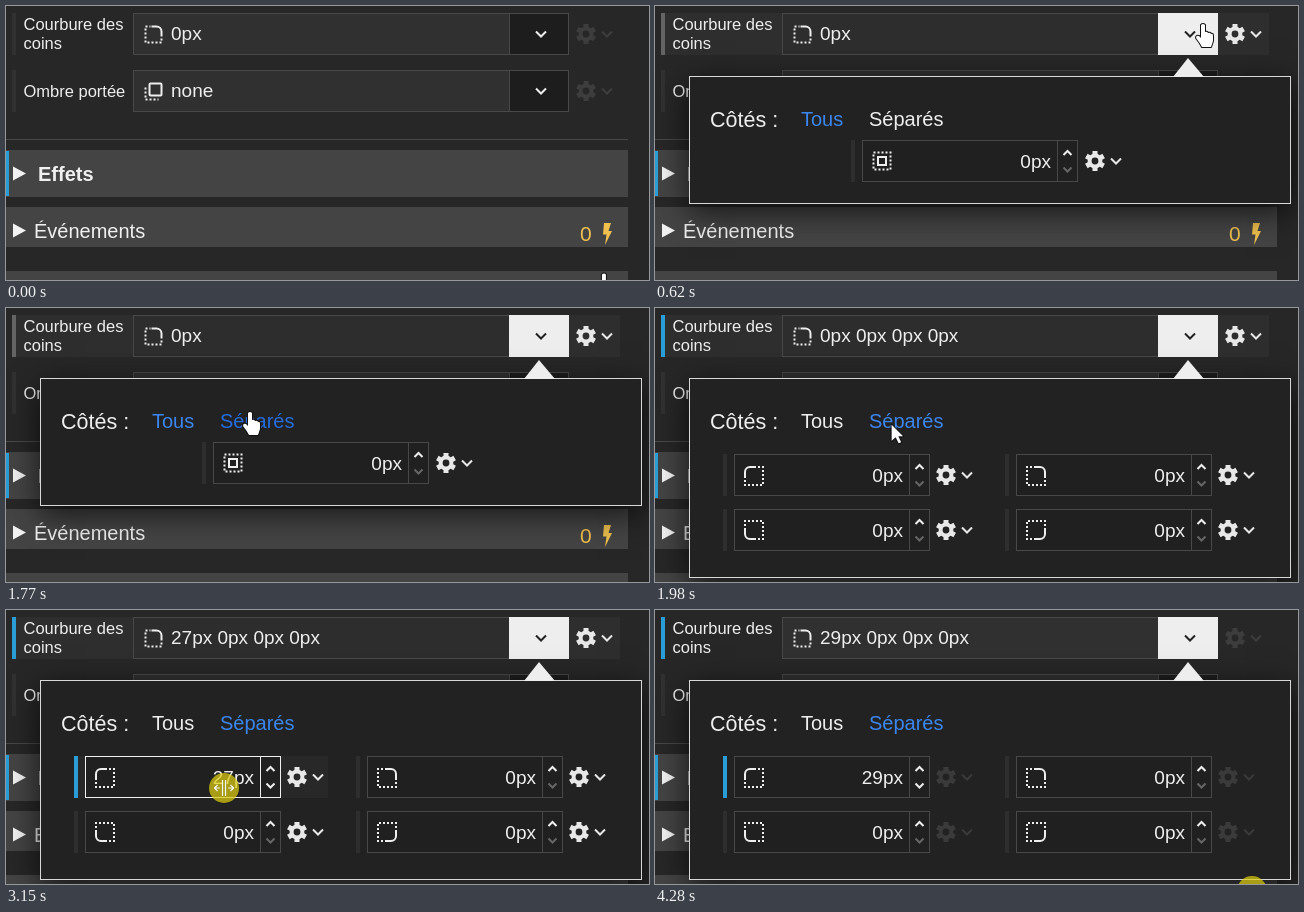
An HTML page with a canvas that plays this animation: 643 px wide and 274 px high, repeating every 4.35 s.

```html
<!DOCTYPE html>
<html lang="fr">
<head>
<meta charset="utf-8">
<title>Courbure des coins</title>
<style>
  html, body { margin: 0; width: 100%; height: 100%; overflow: hidden; background: #272727; }
  canvas { display: block; }
</style>
</head>
<body>
<canvas id="stage" width="643" height="274"></canvas>
<script>
const c = document.getElementById('stage').getContext('2d');
const LOOP = 4350, OPEN = 620, SPLIT = 1840, RELEASE = 3290, LEAVE = 3540;
const BLUE = '#2b9dd6', YELLOW = '#f0c14e', LINK = '#3b86ee', WHITE = '#eee';

// Pointer path: time, x, y
const path = [
  [0, 597, 267], [280, 578, 150], [480, 549, 30], [550, 547, 17], [820, 547, 17],
  [1100, 328, 98], [1240, 268, 120], [1310, 245, 121], [1450, 243, 112], [1600, 243, 103],
  [1850, 243, 103], [2200, 226, 140], [2470, 207, 160], [2600, 191, 173], [2680, 191, 173],
  [2940, 209, 173], [3150, 218, 178], [3250, 220, 177], [3480, 440, 258], [3550, 490, 290],
  [3900, 597, 281], [LOOP, 597, 281]
];
const presses = [[540, 620], [1630, 1770], [2640, RELEASE], [4280, LOOP]];

const hand = new Path2D('M-2 1Q0-1 2 1V8Q4 7 5 9Q7 8 8 10Q10 9 10 12V17Q9 20 8 23H-1Q-3 19-7 14Q-7 11-4 12L-2 14Z');
const arrow = new Path2D('M0 0V16L4 12.5L7 18.5L9.5 17.5L6.7 11.5H11.5Z');
const resize = new Path2D('M-1.5-8V8M1.5-8V8M-4 0H-9M-6.5-3L-9.5 0L-6.5 3M4 0H9M6.5-3L9.5 0L6.5 3');
const bolt = new Path2D('M598 217H605L602.5 225H606L599 239L600.5 228.5H597Z');

const ramp = (t, start, length) => Math.min(1, Math.max(0, (t - start) / length));
const gray = (a, b, k) => { const v = Math.round(a + (b - a) * k); return `rgb(${v},${v},${v})`; };

function pointer(t) {
  const i = path.findIndex(p => p[0] > t), [t0, x0, y0] = path[i - 1], [t1, x1, y1] = path[i];
  const k = (t - t0) / (t1 - t0);
  return [x0 + (x1 - x0) * k, y0 + (y1 - y0) * k];
}

function rect(x, y, w, h, fill) {
  c.fillStyle = fill;
  c.fillRect(x, y, w, h);
}

function box(x, y, w, h, fill, edge) {
  rect(x, y, w, h, fill);
  c.strokeStyle = edge;
  c.lineWidth = 1;
  c.strokeRect(x + .5, y + .5, w - 1, h - 1);
}

function text(s, x, y, size, fill = WHITE, align = 'left', weight = '') {
  c.font = `${weight} ${size}px "Liberation Sans", Arial, sans-serif`;
  c.textAlign = align;
  c.fillStyle = fill;
  c.fillText(s, x, y);
}

function poly(fill, ...p) {
  c.fillStyle = fill;
  c.beginPath();
  for (let i = 0; i < p.length; i += 2) c.lineTo(p[i], p[i + 1]);
  c.fill();
}

function chevron(x, y, color, dir = 1, r = 5) {
  c.strokeStyle = color;
  c.lineWidth = 2;
  c.beginPath();
  c.moveTo(x - r, y - dir * r / 2);
  c.lineTo(x, y + dir * r / 2);
  c.lineTo(x + r, y - dir * r / 2);
  c.stroke();
}

function gear(x, y, color) {
  c.strokeStyle = color;
  c.lineWidth = 4;
  c.beginPath();
  c.arc(x, y, 5.4, 0, 7);
  c.stroke();
  c.lineWidth = 5;
  c.beginPath();
  for (let i = 0; i < 6; i++) {
    const a = Math.PI * (i / 3 + .5);
    c.moveTo(x + 6 * Math.cos(a), y + 6 * Math.sin(a));
    c.lineTo(x + 10 * Math.cos(a), y + 10 * Math.sin(a));
  }
  c.stroke();
  chevron(x + 21, y, color);
}

function strokeIcon(x, y, turns, draw) {
  c.save();
  c.translate(x, y);
  c.rotate(turns * Math.PI / 2);
  c.strokeStyle = WHITE;
  c.lineWidth = 2;
  c.beginPath();
  draw();
  c.stroke();
  c.restore();
}

// Dotted square with one solid rounded corner (top left, then clockwise)
function cornerIcon(x, y, turns, r) {
  strokeIcon(x, y, turns, () => {
    c.moveTo(-r, 2);
    c.arcTo(-r, -r, 2, -r, 5);
    c.lineTo(2, -r);
  });
  strokeIcon(x, y, turns, () => {
    c.setLineDash([2, 2]);
    c.moveTo(4, -r);
    c.lineTo(r, -r);
    c.lineTo(r, r);
    c.lineTo(-r, r);
    c.lineTo(-r, 3);
  });
}

function allIcon(x, y) {
  strokeIcon(x, y, 0, () => { c.setLineDash([2, 2]); c.rect(-8.5, -8.5, 17, 17); });
  strokeIcon(x, y, 0, () => c.rect(-4, -4, 8, 8));
}

function shadowIcon(x, y) {
  strokeIcon(x, y, 0, () => c.roundRect(-4, -8, 12, 12, 1));
  strokeIcon(x, y, 0, () => {
    c.setLineDash([2, 2]);
    c.moveTo(-8, -4);
    c.lineTo(-8, 8);
    c.lineTo(5, 8);
  });
}

function propertyRow(y, value, hover, open, bar) {
  rect(10, y, 604, 42, gray(39, 46, hover));
  rect(6, y, 4, 42, bar || gray(49, 100, hover));
  box(127, y, 377, 42, gray(48, 45, hover), '#484848');
  box(503, y, 60, 42, open ? WHITE : '#1d1d1d', open ? WHITE : '#484848');
  chevron(535, y + 21, open ? '#222' : WHITE);
  gear(580, y + 21, gray(61, 232, hover));
  text(value, 165, y + 27, 19);
}

function numberField(x, y, w, value, lit, hover = 0, bar) {
  const edge = gray(72, 240, hover), spin = x + w;
  if (hover) rect(x - 7, y, w + 75, 42, gray(34, 40, hover));
  rect(x - 11, y, 4, 42, bar || gray(46, 100, hover));
  box(x, y, w + 1, 42, '#202020', edge);
  box(spin, y, 21, 42, '#202020', edge);
  chevron(spin + 10.5, y + 13, WHITE, -1, 4);
  chevron(spin + 10.5, y + 29.5, value ? WHITE : '#666', 1, 4);
  gear(spin + 38 - (w > 180 ? 0 : 1), y + 21, gray(58, 232, lit));
  text(value + 'px', spin - 6, y + 28, 19, WHITE, 'right');
}

function section(y, h, label, x, weight) {
  rect(0, y, 622, h, '#444');
  if (!label) return;
  const m = y + 23.5;
  poly('#f2f2f2', 7, m - 7, 20, m, 7, m + 7);
  text(label, x, m + 7, 20, '#f0f0f0', 'left', weight);
}

function popup(t, value, lit) {
  const split = t >= SPLIT, h = split ? 200 : 128;
  c.save();
  c.shadowColor = 'rgba(0,0,0,.7)';
  c.shadowBlur = 30;
  c.shadowOffsetY = 8;
  rect(34, 70, 602, h, '#222');
  c.restore();
  box(34, 70, 602, h, '#222', '#d8d8d8');
  poly(WHITE, 518, 71, 533, 52, 549, 71);
  text('Côtés :', 55, 121, 21.5);
  text('Tous', 146, 120, 20, split ? WHITE : LINK);
  const k = ramp(t, 1380, 120), mix = (a, b) => Math.round(a + (b - a) * k);
  text('Séparés', 214, 120, 20, split ? LINK : `rgb(${mix(238, 38)},${mix(238, 108)},${mix(238, 222)})`);
  if (!split) {
    numberField(207, 134, 195, 0, 1);
    allIcon(227, 155);
    return;
  }
  const hover = ramp(t, 2200, 150) * (1 - ramp(t, 3330, 100));
  numberField(79, 146, 175, value, lit, hover, value ? BLUE : null);
  numberField(361, 146, 175, 0, lit);
  numberField(79, 201, 175, 0, lit);
  numberField(361, 201, 175, 0, lit);
  cornerIcon(99, 168, 0, 9);
  cornerIcon(381, 168, 1, 9);
  cornerIcon(99, 222, 3, 9);
  cornerIcon(381, 222, 2, 9);
}

function drawPointer(t) {
  const [x, y] = pointer(t);
  if (presses.some(([a, b]) => t >= a && t < b)) {
    c.fillStyle = 'rgba(220,205,15,.72)';
    c.beginPath();
    c.arc(x, y, 15, 0, 7);
    c.fill();
  }
  c.save();
  c.translate(x, y);
  c.lineJoin = 'round';
  if (t >= 2200 && t < RELEASE) {
    c.lineWidth = 1.2;
    c.strokeStyle = '#f4f4f4';
    c.stroke(resize);
  } else {
    const isHand = t < 880 || t >= 1380 && t < 1980;
    const shape = isHand ? hand : arrow;
    if (isHand) c.translate(1, 1);
    c.lineWidth = 2;
    c.strokeStyle = '#111';
    c.stroke(shape);
    c.fillStyle = '#fff';
    c.fill(shape);
  }
  c.restore();
}

function draw(t) {
  const lit = 1 - ramp(t, LEAVE, 400), open = t >= OPEN;
  const x = t < RELEASE ? pointer(t)[0] : 220;
  const value = t < 2680 ? 0 : Math.min(29, Math.round(x - 191));

  rect(0, 0, 643, 274, '#272727');
  propertyRow(7, t < SPLIT ? '0px' : `${value}px 0px 0px 0px`, ramp(t, 400, 130) * lit, open, t >= SPLIT && BLUE);
  cornerIcon(147.5, 28.5, 1, 8);
  propertyRow(64, 'none', ramp(t, 300, 80) * (1 - ramp(t, 420, 120)), false);
  shadowIcon(147.5, 85.5);
  text('Courbure des', 17.5, 24, 16.5);
  text('coins', 17.5, 43, 16.5);
  text('Ombre portée', 17.5, 91, 16.5);

  rect(0, 133, 622, 1, '#484848');
  section(144, 47, 'Effets', 32, 'bold');
  rect(0, 145, 3, 45, BLUE);
  section(201, 40, 'Événements', 28);
  section(265, 9);
  text('0', 574, 235, 21, YELLOW);
  c.fillStyle = YELLOW;
  c.fill(bolt);

  if (open) popup(t, value, lit);
  drawPointer(t);
}

const start = performance.now();
function tick() {
  draw((performance.now() - start) % LOOP);
  requestAnimationFrame(tick);
}
tick();
</script>
</body>
</html>
```
